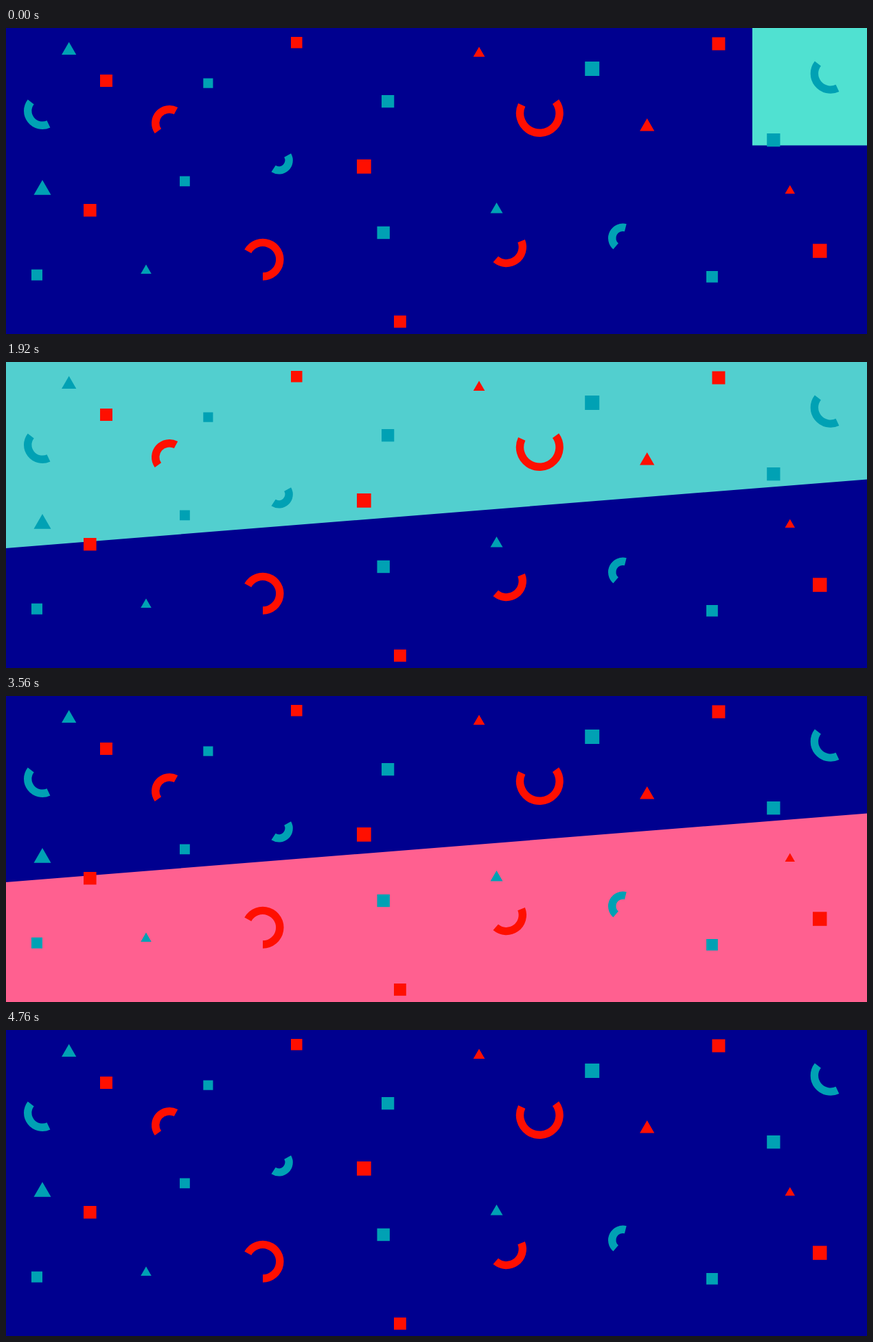
Write an HTML page that moves like this. It is 1254 by 447 pixels and loops after 4800 ms.

```html
<!DOCTYPE html>
<html lang="en">
<head>
<meta charset="utf-8">
<title>Confetti panels</title>
<style>
  html, body { margin: 0; width: 100%; height: 100%; overflow: hidden; background: #00008f; }
  svg { display: block; width: 100%; height: 100%; }
</style>
</head>
<body>
<svg viewBox="0 0 1254 447">
  <polygon id="upper"/>
  <polygon id="lower"/>
  <g id="confetti"></g>
</svg>
<script>
const W = 1254, H = 447, LEFT_Y = 272, RIGHT_Y = 171.4;
const LOOP = 4800, HALF = LOOP / 2, STEP = 40;
const WIPE = 760, BLINK = 200, BLINK_END = WIPE + 4 * BLINK;
const RED = '#ff0f00', TEAL = '#00a1b4';
const byId = id => document.getElementById(id);
const lerp = (a, b, p) => a + (b - a) * p;
const clamp = v => Math.min(1, Math.max(0, v));

function addPath(d, attributes) {
  const path = document.createElementNS('http://www.w3.org/2000/svg', 'path');
  for (const [name, value] of Object.entries({ d, ...attributes })) path.setAttribute(name, value);
  byId('confetti').append(path);
}

// Top left corner and side.
function square(fill, x, y, side) {
  addPath(`M${x} ${y}h${side}v${side}h${-side}z`, { fill });
}

// Apex and base width; equilateral.
function triangle(fill, x, y, width) {
  addPath(`M${x} ${y}l${width / 2} ${width * Math.sqrt(3) / 2}h${-width}z`, { fill });
}

// Centre, outer radius and start angle; large rings sweep 241 degrees, small ones 153.
function arc(stroke, x, y, radius, startAngle) {
  const thickness = 11.4, r = radius - thickness / 2;
  const sweep = radius > 30 ? 241 : 153;
  const point = degrees => {
    const angle = degrees * Math.PI / 180;
    return `${x + r * Math.cos(angle)} ${y + r * Math.sin(angle)}`;
  };
  addPath(`M${point(startAngle)}A${r} ${r} 0 ${sweep > 180 ? 1 : 0} 1 ${point(startAngle + sweep)}`,
    { stroke, fill: 'none', 'stroke-width': thickness });
}

square(RED, 415, 13, 16.5);
square(RED, 137, 68, 18);
square(RED, 1028.4, 13.5, 19);
square(RED, 511, 192, 20.7);
square(RED, 113, 257, 18.6);
square(RED, 1175, 315.3, 20.5);
square(RED, 565, 420, 17.8);
square(TEAL, 287.3, 73.5, 14.2);
square(TEAL, 547, 98, 18.3);
square(TEAL, 843.2, 49, 21);
square(TEAL, 1108.2, 154, 19.3);
square(TEAL, 253, 216.5, 14.8);
square(TEAL, 540.5, 289.8, 18.4);
square(TEAL, 37, 352.7, 16);
square(TEAL, 1020, 355, 16.8);

triangle(RED, 689, 27.5, 16.8);
triangle(RED, 933.7, 132, 21.3);
triangle(RED, 1141.8, 229.5, 14.5);
triangle(TEAL, 91.7, 20.5, 21.3);
triangle(TEAL, 53, 222, 25);
triangle(TEAL, 714.5, 255, 18);
triangle(TEAL, 204, 345.5, 15.5);

arc(RED, 238, 139, 26, 145);
arc(RED, 777.3, 124.5, 34.5, -36);
arc(RED, 374, 338.2, 30.5, 209);
arc(RED, 728.7, 320, 29.3, -22);
arc(TEAL, 53, 121, 27, 65);
arc(TEAL, 397.5, 193.3, 20.3, -30);
arc(TEAL, 1201, 66.5, 29.3, 65);
arc(TEAL, 898.5, 307, 21.5, 131);

const upper = {
  node: byId('upper'), start: 0, fadeStart: 1880, fadeEnd: 2400, color: '#50e1d1', fadeColor: '#c2e2ff',
  shape(p) {
    const x = lerp(1087, 0, p);
    return [[x, 0], [W, 0], [W, RIGHT_Y], [x, lerp(RIGHT_Y, LEFT_Y, p)]];
  },
};
const lower = {
  node: byId('lower'), start: HALF, fadeStart: 2000, fadeEnd: 2360, color: '#ff6090', fadeColor: '#ff6090',
  shape(p) {
    const x = lerp(177, W, p);
    return [[0, LEFT_Y], [x, lerp(LEFT_Y, RIGHT_Y, p)], [x - 2 * (1 - p), H], [0, H]];
  },
};

// Each panel wipes in, blinks twice, holds, then fades.
function drawPanel(panel, loopTime) {
  const time = loopTime - panel.start;
  const blinking = time >= WIPE && time < BLINK_END;
  const hidden = time < 0 || (blinking && Math.floor((time - WIPE) / BLINK) % 2 === 1);
  const fade = clamp((time - panel.fadeStart) / (panel.fadeEnd - panel.fadeStart));
  panel.node.setAttribute('points', panel.shape(clamp(time / WIPE)).join(' '));
  panel.node.style.fill = `color-mix(in srgb, ${panel.fadeColor} ${fade * 100}%, ${panel.color})`;
  panel.node.style.opacity = hidden ? 0 : 1 - fade;
}

const startTime = performance.now();
function tick() {
  const elapsed = (performance.now() - startTime) % LOOP;
  const time = Math.floor(elapsed / STEP) * STEP;
  drawPanel(upper, time);
  drawPanel(lower, time);
  requestAnimationFrame(tick);
}
tick();
</script>
</body>
</html>
```
